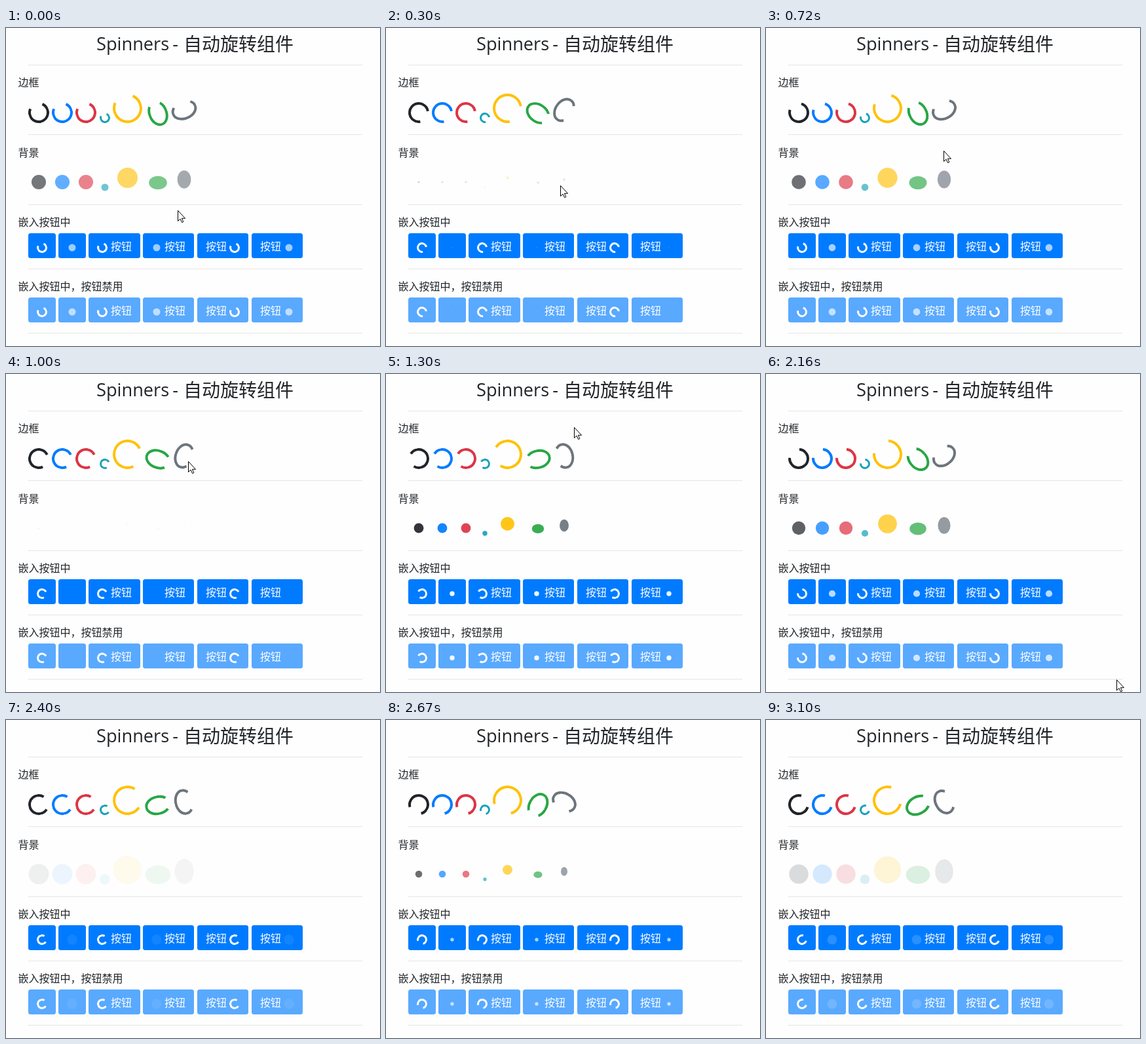
Recreate the animation shown at these times as an HTML page. Size 571 by 485 pixels, loop 3.2 s.

```html
<!DOCTYPE html>
<html lang="zh-CN">
<head>
<meta charset="utf-8">
<title>Spinners</title>
<style>
html, body { margin: 0; width: 100%; height: 100%; overflow: hidden; background: #fefefe; }
svg { position: absolute; left: 0; top: 0; width: 571px; height: 485px; }
text { font: 16px "Noto Sans CJK SC", "Noto Sans CJK", sans-serif; fill: #212529; }
.spin { position: absolute; box-sizing: border-box; border-radius: 50%; }
.border { border: 4px solid; border-right-color: transparent; }
.small { border-width: 3px; }
.grow { background: currentColor; }
</style>
</head>
<body>
<svg id="page"></svg>
<svg id="top"><path id="cursor" fill="#fff" stroke="#000" d="M.5 .5V16.5L4 13.2 6.6 18.6 8.8 17.6 6.4 12.3H11.5Z"/></svg>
<script>
const LOOP = 3200, TURN = 733, PHASE = 0.69;
const LEFT = 34, GAP = 4.384;
const STEPS = [0, 150, 300, 450, 570, 720, 880, 1000, 1150, 1300, 1450, 1580,
  1730, 1880, 2010, 2160, 2280, 2400, 2550, 2670, 2820, 2970, 3100];
// time, x, y of the pointer; it leaves the stage after the last one
const PATH = [[0, 262, 278], [720, 271, 187], [1150, 281, 104], [1300, 287, 81],
  [1450, 345, 160], [1580, 467, 330], [1730, 499, 376], [1880, 521, 418],
  [2010, 533, 443], [2160, 535, 466], [2280, 535, 480]];
const SPINNERS = [['#212529', 32, 32], ['#007bff', 32, 32], ['#dc3545', 32, 32],
  ['#17a2b8', 16, 16], ['#ffc107', 45, 45], ['#28a745', 40, 30], ['#6c757d', 30, 40]];
const BUTTONS = [['border'], ['grow'], ['border', 'text'], ['grow', 'text'],
  ['text', 'border'], ['text', 'grow']];

const page = document.getElementById('page');
const topLayer = document.getElementById('top');
const cursor = document.getElementById('cursor');
const borders = [], grows = [];

function draw(tag, attrs, content = '') {
  const el = document.createElementNS('http://www.w3.org/2000/svg', tag);
  for (const name in attrs) el.setAttribute(name, attrs[name]);
  el.textContent = content;
  page.append(el);
}

function label(x, y, content, style = '') {
  draw('text', { x, y, style }, content);
}

function spinner(kind, x, y, w, h, color) {
  const el = document.createElement('div');
  el.className = `spin ${kind}${w < 20 ? ' small' : ''}`;
  el.style.cssText = `left:${Math.floor(x)}px;top:${y}px;width:${w}px;height:${h}px;color:${color}`;
  document.body.insertBefore(el, topLayer);
  (kind === 'border' ? borders : grows).push(el);
}

function spinnerRow(kind, bottom) {
  let x = LEFT;
  for (const [color, w, h] of SPINNERS) {
    spinner(kind, x, bottom - h, w, h, color);
    x += w + GAP;
  }
}

function buttonRow(y, fill) {
  let x = LEFT;
  for (const parts of BUTTONS) {
    const width = parts.length > 1 ? 74 + GAP : 42;
    const left = Math.floor(x);
    draw('rect', { x: left, y, width: Math.floor(x + width) - left, height: 38, rx: 3.5, fill });
    let inner = x + 13;
    for (const part of parts) {
      if (part === 'text') label(Math.floor(inner), y + 26.4, '按钮', 'fill:#fff');
      else spinner(part, inner, y + 14, 16, 16, '#fff');
      inner += (part === 'text' ? 32 : 16) + GAP;
    }
    x += width + GAP;
  }
}

label(138, 34, 'Spinners -', 'font:27.2px "Open Sans","Noto Sans",sans-serif;word-spacing:-2px');
label(271, 34.5, '自动旋转组件', 'font-size:28px');
for (const y of [56, 162, 269, 367, 465])
  draw('rect', { x: LEFT, y, width: 510, height: 1, fill: '#e5e5e5' });
label(18.5, 89, '边框');
label(18.5, 195.5, '背景');
label(18.5, 302, '嵌入按钮中');
label(18.5, 400, '嵌入按钮中，按钮禁用');
spinnerRow('border', 145);
spinnerRow('grow', 251);
buttonRow(313, '#007bff');
buttonRow(411, '#59a9ff');

function moveCursor(t) {
  const next = PATH.findIndex(p => p[0] >= t);
  cursor.style.display = next < 0 ? 'none' : '';
  if (next < 0) return;
  const b = PATH[next], a = PATH[Math.max(next - 1, 0)];
  const k = b === a ? 0 : (t - a[0]) / (b[0] - a[0]);
  const at = i => Math.round(a[i] + (b[i] - a[i]) * k);
  cursor.setAttribute('transform', `translate(${at(1)} ${at(2)})`);
}

function render(time) {
  const t = STEPS.findLast(s => s <= time % LOOP);
  const p = (PHASE + t / TURN) % 1;
  for (const el of borders) el.style.transform = `rotate(${p}turn)`;
  for (const el of grows) {
    el.style.transform = `scale(${p})`;
    el.style.opacity = 1 - Math.abs(2 * p - 1);
  }
  moveCursor(t);
}

const start = performance.now();
function tick() {
  render(performance.now() - start);
  requestAnimationFrame(tick);
}
tick();
</script>
</body>
</html>
```
